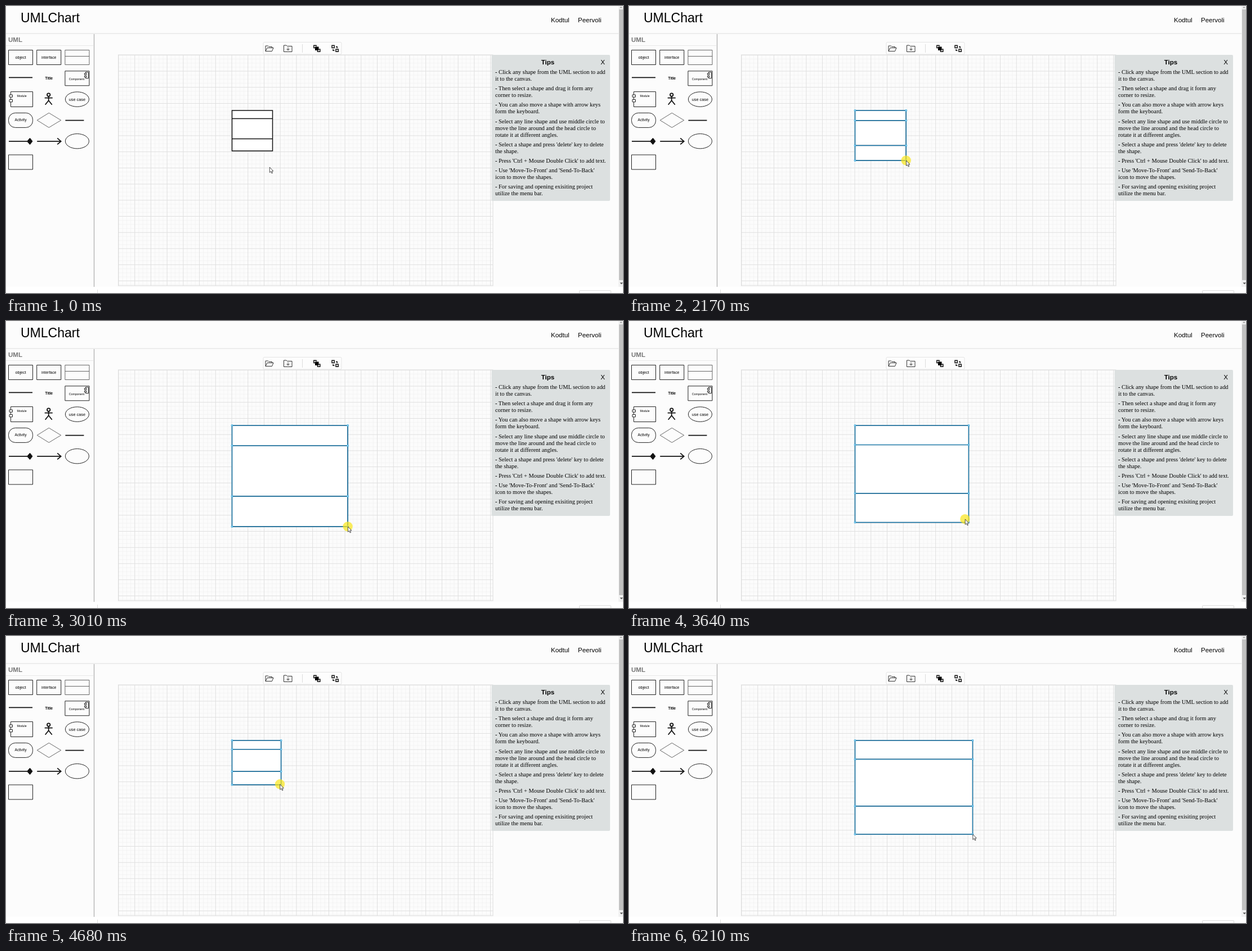
An HTML page that plays this animation: 1096x511 px, repeating every 6400 ms.

```html
<!DOCTYPE html>
<html lang="en">
<head>
<meta charset="utf-8">
<title>UMLChart</title>
<style>
html, body { margin: 0; width: 100%; height: 100%; overflow: hidden; background: #fff; }
svg { display: block; width: 1096px; height: 511px; font: 11.52px "Liberation Sans", Arial, sans-serif; }
.mid, #palette { text-anchor: middle; }
#tips { font: 10.37px "Liberation Serif", "Times New Roman", serif; }
#palette path, #palette rect, #palette ellipse { fill: none; stroke: #222; }
#palette .bold { stroke: #111; stroke-width: 1.8; }
#palette .thin { stroke: #555; stroke-width: .9; }
#palette .solid { fill: #111; }
.icon { fill: none; stroke: #333; }
.order { fill: none; stroke: #111; stroke-width: 1.5; }
</style>
</head>
<body>
<svg viewBox="0 0 1096 511">
  <defs>
    <pattern id="grid" x="199.5" y="86.8" width="28.72" height="28.72" patternUnits="userSpaceOnUse">
      <path id="minor" stroke="#f3f3f3"/>
      <path d="M0 .5H28.72M.5 0V28.72" stroke="#dfdfdf"/>
    </pattern>
  </defs>

  <!-- page frame -->
  <rect width="1088" height="500" fill="#fcfcfc"/>
  <path d="M0 49H1088" stroke="#ddd"/>
  <path d="M0 70.5H155" stroke="#e8e8e8"/>
  <path d="M156.5 50V500" stroke="#b5b5b5" stroke-width="1.4"/>
  <path d="M162.5 505V511M1018.5 511V508Q1018.5 506.5 1020 506.5H1073Q1074.5 506.5 1074.5 508V511" fill="none" stroke="#ddd"/>
  <rect x="1088" width="8" height="500" fill="#f1f1f1"/>
  <rect x="1089" y="6" width="7" height="482" fill="#c1c1c1"/>
  <path d="M1090 3.5L1092.5 1L1095 3.5Z" fill="#999"/>
  <path d="M1090.5 492.5H1096L1093.2 495.5Z" fill="#505050"/>
  <text x="26" y="29" font-size="23">UMLChart</text>
  <text x="968" y="29">Kodtul</text>
  <text x="1016" y="29">Peervoli</text>
  <text x="4" y="64" font-weight="bold" fill="#777">UML</text>
  <g id="palette"></g>

  <!-- canvas and toolbar -->
  <rect x="199.5" y="87" width="665.5" height="411" fill="url(#grid)" stroke="#ddd"/>
  <rect x="457" y="64.5" width="139" height="21.5" rx="2" fill="#fdfdfd" stroke="#e4e4e4"/>
  <path d="M526.5 68V83" stroke="#ddd"/>
  <path class="icon" d="M461 80.5V71H465.5L467 72.5H472.5V74.5M461 80.5L464 74.5H475L472.5 80.5Z"/>
  <path class="icon" d="M493.5 70H498L499.5 71.5H508V81.5H493.5ZM501 73.5V79M498.5 76.5L501 79L503.5 76.5"/>
  <path class="order" d="M549 74.5H546.8V70.3H551V72M555.5 77H557.8V81.2H553.5V79"/>
  <path d="M549 72.5H555.5V79H549Z"/>
  <path class="order" d="M579 70.3H583.2V74.5H579ZM586 77H590.2V81.2H586ZM586 72.5H588.2V75M581 77V79.2H583.5"/>

  <!-- help panel -->
  <rect x="862.5" y="87" width="210.5" height="260" rx="2" fill="#dce0e0"/>
  <text class="mid" x="962.5" y="104" font-weight="bold">Tips</text>
  <text class="mid" x="1060" y="104">X</text>
  <g id="tips"></g>

  <!-- moving parts -->
  <path id="shape" fill="#fff"/>
  <path id="glow" fill="none" stroke="#1b85bd"/>
  <path id="grips" fill="#fff" stroke="#29a3dc"/>
  <circle id="press" r="8.7" fill="#fae61e" fill-opacity=".72"/>
  <path id="arrow" d="M0 0V9.5L2.2 7.6L3.8 11L5.2 10.4L3.8 7H6.5Z" fill="#fff" stroke="#222" stroke-width=".8"/>
</svg>
<script>
const $ = id => document.getElementById(id);
const LOOP = 6400, LEFT = 401.5, TOP = 186;

$("minor").setAttribute("d", [1, 2, 3].map(i => i * 7.18 + .5)
  .map(p => `M${p} 0V28.72M0 ${p}H28.72`).join(""));

// palette icons, each drawn around the centre of its cell
const path = (d, kind = "") => `<path class="${kind}" d="${d}"/>`;
const label = (text, size, y = 2.6, x = 0) => `<text x="${x}" y="${y}" font-size="${size}">${text}</text>`;
const box = path("M-21.5 -13H21.5V13H-21.5Z");
const oval = '<ellipse rx="21" ry="13.2"/>';
const icons = [
  box + label("object", 7.2),
  box + label("interface", 6.9),
  path("M-21.5 -13H21.5V13H-21.5ZM-21.5 -2H21.5", "thin"),
  path("M-21 -1.4H21", "bold"),
  `<g font-weight="bold">${label("Title", 6.6)}</g>`,
  box + path("M15 -9H13V-6.5H16.5V-9H15V-11H20V0H15V-2M13 -4.5H16.5V-2H13Z") + label("Component", 5.3, 3.5, -1),
  path("M-17.5 -8V-13.5H21.5V13.4H-17.5V5M-17.5 0V-4M-20 -8H-14.5V-4H-20ZM-20 .5H-14.5V4.7H-20Z") + label("Module", 5.2, -4.6, 2),
  '<ellipse class="bold" cx="-.5" cy="-8" rx="2.7" ry="2.7"/>' +
    path("M-.5 -5V2.2L-6.5 9.7M-.5 2.2L5.5 9.7M-7.5 -2.5H6.5", "bold"),
  oval + label("use case", 7.3),
  '<rect x="-21.5" y="-13" width="43" height="26" rx="12"/>' + label("Activity", 6.6, 2),
  path("M-21 0L0 -13L21.5 0L0 13Z", "thin"),
  path("M-21 .2H12", "bold"),
  path("M-21 .2H12", "bold") + path("M11.5 .2L16.5 -5.6L21 .2L16.5 6Z", "solid"),
  path("M-21 .2H21M15 -5.3L21.5 .2L15 5.7", "bold"),
  oval,
  box
];
$("palette").innerHTML = icons.map((icon, i) =>
  `<g transform="translate(${26 + i % 3 * 50.2} ${91.5 + Math.floor(i / 3) * 37.3})">${icon}</g>`).join("");

const tips = `Click any shape from the UML section to add|it to the canvas.
Then select a shape and drag it form any|corner to resize.
You can also move a shape with arrow keys|form the keyboard.
Select any line shape and use middle circle to|move the line around and the head circle to|rotate it at different angles.
Select a shape and press 'delete' key to delete|the shape.
Press 'Ctrl + Mouse Double Click' to add text.
Use 'Move-To-Front' and 'Send-To-Back'|icon to move the shapes.
For saving and opening exisiting project|utilize the menu bar.`;
let baseline = 121;
for (const tip of tips.split("\n")) {
  tip.split("|").forEach((row, i) => {
    const dash = i ? "" : '<tspan font-weight="bold">-</tspan> ';
    $("tips").innerHTML += `<text x="869" y="${baseline}">${dash}${row}</text>`;
    baseline += 12;
  });
  baseline += 5.2;
}

// turning points of the pointer: time, x, y
const DRAG = 2000, TRAIL = 28;
const turns = [
  [0, 468, 287], [670, 467, 251], [1040, 467, 251], [1630, 473.5, 256], [DRAG, 473.5, 257],
  [2170, 492, 275], [2620, 560, 323], [2800, 560, 323], [3010, 607, 366], [3460, 640, 390],
  [3640, 597, 353], [4160, 527, 280], [4680, 486.5, 264], [4830, 486.5, 264],
  [5200, 600.5, 343], [5910, 610.5, 353], [LOOP, 610.5, 353]
];

function pointer(t) {
  const n = turns.findIndex(turn => turn[0] > t);
  const [t0, x0, y0] = turns[n - 1], [t1, x1, y1] = turns[n];
  const u = (t - t0) / (t1 - t0);
  return [x0 + (x1 - x0) * u, y0 + (y1 - y0) * u];
}

// the dragged corner trails the pointer while the shape shrinks
function corner(t) {
  if (t < DRAG + TRAIL) return [473.5, 258];
  const before = pointer(t - TRAIL);
  return pointer(t).map((v, i) => Math.max(v, before[i]));
}

const show = (id, on) => $(id).style.display = on ? "" : "none";
const place = (id, x, y) => $(id).setAttribute("transform", `translate(${x} ${y})`);

function draw(t) {
  const [x, y] = pointer(t);
  const [right, bottom] = corner(t);
  const picked = t >= 800;
  const rows = [0, .2, .7, 1].map(f => TOP + (bottom - TOP) * f);
  const outline = `M${LEFT} ${TOP}V${bottom}M${right} ${TOP}V${bottom}` +
    rows.map(r => `M${LEFT} ${r}H${right}`).join("");

  $("shape").setAttribute("d", `M${LEFT} ${TOP}H${right}V${bottom}H${LEFT}Z` + outline);
  $("shape").setAttribute("stroke", picked ? "#24536d" : "#111");
  $("shape").setAttribute("stroke-width", picked ? 1.7 : 1.5);
  $("glow").setAttribute("d", outline);
  $("grips").setAttribute("d", rows.map(r => [LEFT, right].map(c =>
    `M${c - 1.2} ${r - 1.2}h2.4v2.4h-2.4z`).join("")).join(""));
  show("glow", picked);
  show("grips", picked);
  show("press", t >= 740 && t < 860 || t >= 1860 && t < 6210);
  place("press", x, y - .2);
  place("arrow", x + .3, y);
}

function tick() {
  draw(performance.now() % LOOP);
  requestAnimationFrame(tick);
}
tick();
</script>
</body>
</html>
```
